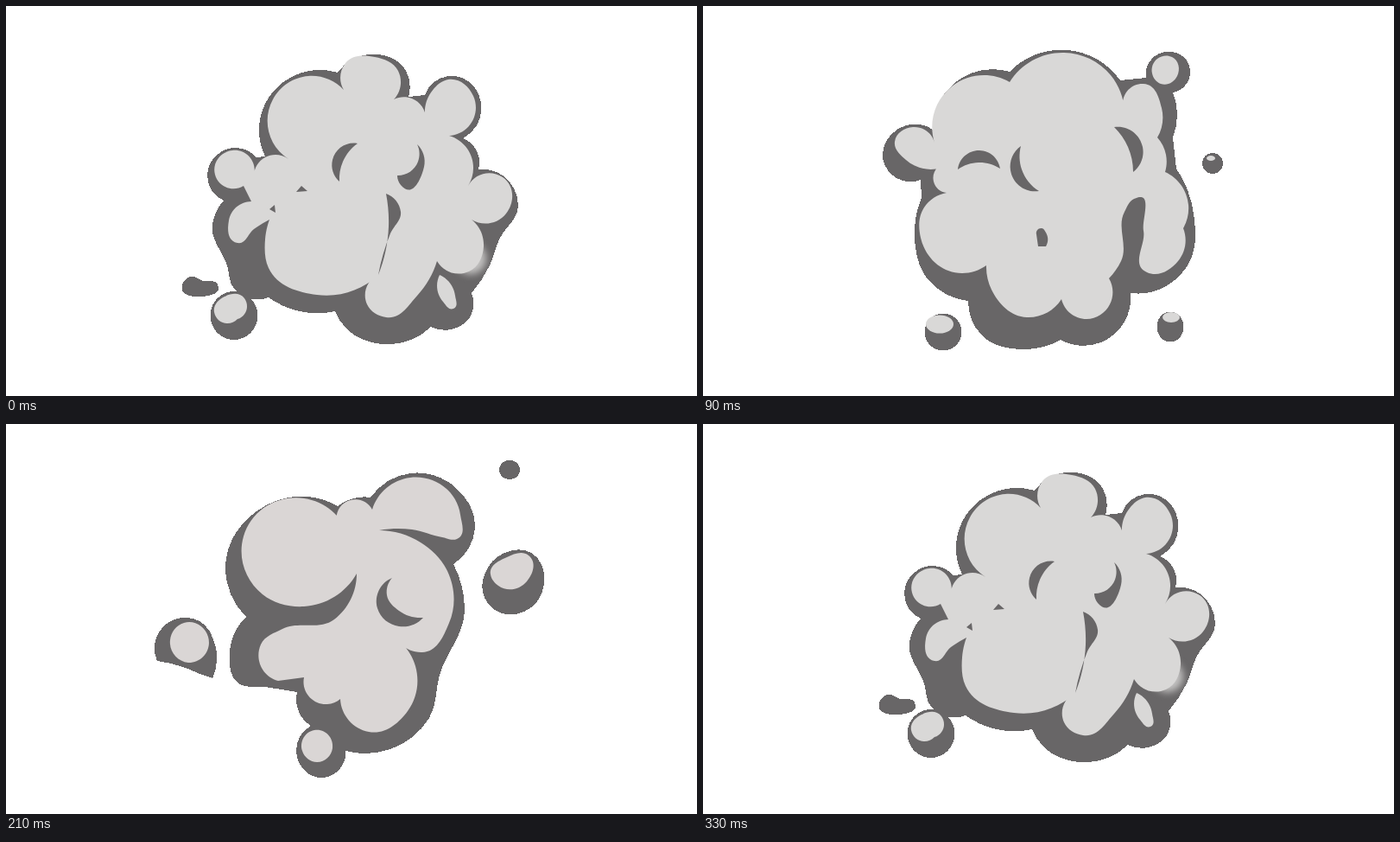
Animation, 800 px wide and 451 px high, one loop 360 ms. Source, as an HTML page:

```html
<!DOCTYPE html>
<html lang="en">
<head>
<meta charset="utf-8">
<title>Smoke puff</title>
<style>
  html, body { margin: 0; width: 100%; height: 100%; overflow: hidden; background: #fff; }
  svg { display: block; width: 800px; height: 451px; }
  svg > g { visibility: hidden; animation: show 360ms step-end infinite; animation-delay: var(--at); }
  svg > g.long { animation-name: show-long; }
  .shade { fill: #686667; shape-rendering: crispEdges; }
  .light { fill: #d9d8d7; }
  .warm .light { fill: #dad6d5; }
  .fold { fill: #686667; }
  .soft { fill: #c4c3c2; filter: blur(4px); }
  @keyframes show { 0% { visibility: visible; } 16.666%, 100% { visibility: hidden; } }
  @keyframes show-long { 0% { visibility: visible; } 33.333%, 100% { visibility: hidden; } }
</style>
</head>
<body>
<!-- data-via: points of a round closed outline, "!" marks a sharp corner -->
<svg viewBox="0 0 800 451">
  <g class="long" style="--at:-60ms">
    <g class="shade">
      <path data-via="384,77! 420,56 464,77 466,105! 485,103! 497,87 528,83 550,112 529,153! 546,170 547,189! 575,196 593,230 571,270 560,300 539,332! 537,360 515,374 492,371! 435,391 394,373 381,353! 340,353 304,337! 264,327 256,300 239,252 252,225! 233,196 250,168 290,175! 300,174! 293,140 321,88"/>
      <path data-via="205,320 213,313 228,318 245,322 228,336"/>
      <ellipse cx="264" cy="358" rx="27.5" ry="28"/>
    </g>
    <circle class="soft" cx="538" cy="292" r="18"/>
    <g class="light">
      <path data-via="391,97! 393,66 427,59 454,75 449,108! 470,107 486,132! 492,100 512,85 541,104 513,150! 534,165 535,208! 575,198 579,240 539,247! 553,278 536,307 499,295! 476,335 440,360 418,345 431,311! 360,334 304,303 300,270 305,247! 287,258 268,274 258,248 284,226! 275,208! 242,195 262,167 287,196! 300,175 327,177! 309,108 350,81"/>
      <path data-via="502,311! 520,335 518,350 506,342"/>
      <path data-via="241,354 253,336 276,338 268,362!"/>
    </g>
    <g class="fold">
      <path data-via="407,159! 378,178 386,203! 390,180"/>
      <path data-via="476,160! 484,186 457,207 453,196! 477,180"/>
      <path data-via="440,217! 457,238 445,263 431,311! 443,255"/>
      <path data-via="336,215! 342,208! 349,214!"/>
      <path data-via="305,235! 311,230! 312,239!"/>
    </g>
  </g>

  <g style="--at:-300ms">
    <g class="shade">
      <path data-via="355,76! 422,51 483,86! 513,83! 528,55 564,75 544,100! 549,125 544,152! 548,188! 568,240 561,300 512,332 495,332! 478,378 414,386! 372,397 322,380 307,341! 262,318 245,260 253,222! 252,201! 210,183 226,142 266,143! 290,90"/>
      <circle cx="590" cy="182" r="12"/>
      <circle cx="278" cy="377" r="21.5"/>
      <ellipse cx="541" cy="371" rx="15.5" ry="17.5"/>
    </g>
    <g class="light">
      <path data-via="355,88! 418,54 472,80 488,122! 510,90 531,118 526,152! 536,172 535,192! 562,230 556,257! 550,295 514,308 510,260 499,223 488,238 484,295 470,315! 471,345 444,362 415,339! 375,360 334,328 328,300! 300,309 252,268 256,233 282,216! 267,203 287,182! 235,178 222,157 243,140 268,158! 288,93"/>
      <path data-via="520,78 526,61 543,59 549,81 530,90"/>
      <ellipse cx="588" cy="176" rx="5" ry="3"/>
      <ellipse cx="274" cy="368" rx="16" ry="10.5"/>
      <ellipse cx="542" cy="360" rx="10" ry="6"/>
    </g>
    <g class="fold">
      <path data-via="295,189! 320,167 344,188! 319,181"/>
      <path data-via="368,162! 356,190 389,214! 369,189"/>
      <path data-via="476,140! 509,163 498,192! 492,163"/>
      <path data-via="386,264! 392,257 397,262 397,278! 388,278!"/>
    </g>
  </g>

  <g style="--at:-240ms">
    <g class="shade">
      <path data-via="377,108! 395,76 445,75 482,101! 528,115 548,163! 574,163 577,212 540,218! 534,245! 541,285 522,318! 500,368 440,385 407,375! 366,410 330,378 335,353! 313,342! 275,337 257,302! 223,262 246,235! 246,222! 219,193 253,145! 300,101 345,97"/>
      <path data-via="546,60 560,41 576,51 573,69 555,73"/>
      <path data-via="549,360 562,349 573,360 563,378"/>
      <ellipse cx="594" cy="173" rx="4" ry="5"/>
      <circle cx="275" cy="371" r="12"/>
    </g>
    <g class="light">
      <path data-via="408,152! 389,95 425,76 457,92 447,119! 478,105 519,120 529,165 518,216 480,241 419,232! 465,260 510,246! 528,268 497,302! 490,337 440,352 407,335 395,308! 350,329 318,308! 285,303 272,288! 241,262 261,250! 256,228 330,203 369,217! 373,213! 320,190 265,207! 242,182 258,165! 266,128 330,100 388,122"/>
      <path data-via="552,54 567,43 562,55"/>
      <path data-via="557,172 569,166 579,188 566,192"/>
      <ellipse cx="363" cy="382" rx="21" ry="20.5"/>
    </g>
    <ellipse class="fold" cx="471" cy="144" rx="8" ry="2"/>
  </g>

  <g class="warm" style="--at:-180ms">
    <g class="shade">
      <path data-via="384,95! 402,86 422,85! 468,57 520,73 543,120 518,162! 531,215 502,290 490,340 445,376 393,378! 365,409 337,385 353,349! 339,333 337,310! 300,304 268,299 259,265 278,223! 255,155 290,101 350,84"/>
      <path data-via="175,274! 186,231 224,228 242,255 239,294! 222,288! 205,281"/>
      <path data-via="555,172! 575,150 608,149 623,185 600,217 562,212"/>
      <ellipse cx="583" cy="53" rx="12" ry="11"/>
    </g>
    <g class="light">
      <path data-via="397,130! 345,86 275,130 297,197 345,211 406,173! 380,226 320,237 295,255 315,297! 345,293! 372,324 387,318! 420,356 465,332 474,280 453,249! 482,264 513,230 511,170 480,137 432,123! 470,122 505,131 522,133 526,105 468,62 424,99! 399,88"/>
      <path data-via="190,250 206,230 234,246 211,276!"/>
      <path data-via="561,174 580,154 605,152 603,182 570,187"/>
      <path data-via="343,378 357,354 378,375 360,391"/>
    </g>
    <path class="fold" data-via="447,178! 430,213 455,234 483,224! 455,216 441,198"/>
  </g>

  <g style="--at:-120ms">
    <g class="shade">
      <path data-via="383,95! 402,56 438,56 452,97! 492,104 502,148! 523,160 538,184! 575,176 606,208 548,245! 553,290 521,326! 495,382 445,391 396,358! 365,365 323,338! 305,343 287,337! 240,353 222,310 255,288! 280,262! 247,230 256,185 299,180! 306,113 350,87"/>
      <path data-via="201,268 220,243 244,265 228,299! 208,281!"/>
    </g>
    <circle class="soft" cx="254" cy="307" r="9"/>
    <g class="light">
      <path data-via="404,118! 389,78 420,58 439,75 435,110! 470,97 491,120 490,159! 513,155 534,208! 555,182 600,200 560,246 534,231! 522,251! 525,290 493,299! 490,340 438,360 417,328! 385,337 366,325! 320,306 294,270 325,221 358,220! 345,210 303,215 300,190 326,187! 316,120 360,92"/>
      <path data-via="282,243! 256,220 265,186 287,190 284,212 289,236"/>
      <ellipse cx="244" cy="319" rx="17" ry="16.5"/>
      <path data-via="205,262 218,247 226,260 214,273"/>
    </g>
    <g class="fold">
      <path data-via="431,127! 401,155 418,185! 413,152"/>
      <path data-via="448,181! 431,202 451,213! 446,198"/>
    </g>
  </g>
</svg>
<script>
const sub = (a, b) => [a[0] - b[0], a[1] - b[1]];
const dot = (a, b) => a[0] * b[0] + a[1] * b[1];
const scale = (a, k) => [a[0] * k, a[1] * k];
const unit = a => scale(a, 1 / Math.hypot(...a));

// Direction at b of the circle through a, b and c.
function tangent(a, b, c) {
  const u = sub(b, a), v = sub(c, b);
  const p = scale(u, 1 / dot(u, u)), q = scale(v, 1 / dot(v, v));
  return unit([p[0] + q[0], p[1] + q[1]]);
}

// Mirrors a direction about a chord, as at the two ends of an arc.
const mirror = (t, chord) => sub(scale(chord, 2 * dot(t, chord)), t);

function outline(text) {
  const marks = text.split(' ');
  const pts = marks.map(s => s.split(',').map(parseFloat));
  const n = pts.length;
  const at = i => pts[(i + n) % n];
  const dirs = pts.map((p, i) => marks[i].endsWith('!') ? null : tangent(at(i - 1), p, at(i + 1)));
  let d = 'M' + pts[0];
  for (let i = 0; i < n; i++) {
    const a = at(i), b = at(i + 1), span = sub(b, a), chord = unit(span);
    let s = dirs[i], e = dirs[(i + 1) % n];
    if (!s) s = e ? mirror(e, chord) : chord;
    if (!e) e = mirror(s, chord);
    const reach = t => Math.hypot(...span) * 2 / (3 * (1 + Math.max(0, dot(t, chord))));
    d += `C${sub(a, scale(s, -reach(s)))} ${sub(b, scale(e, reach(e)))} ${b}`;
  }
  return d + 'Z';
}

for (const path of document.querySelectorAll('[data-via]'))
  path.setAttribute('d', outline(path.dataset.via));
</script>
</body>
</html>
```
